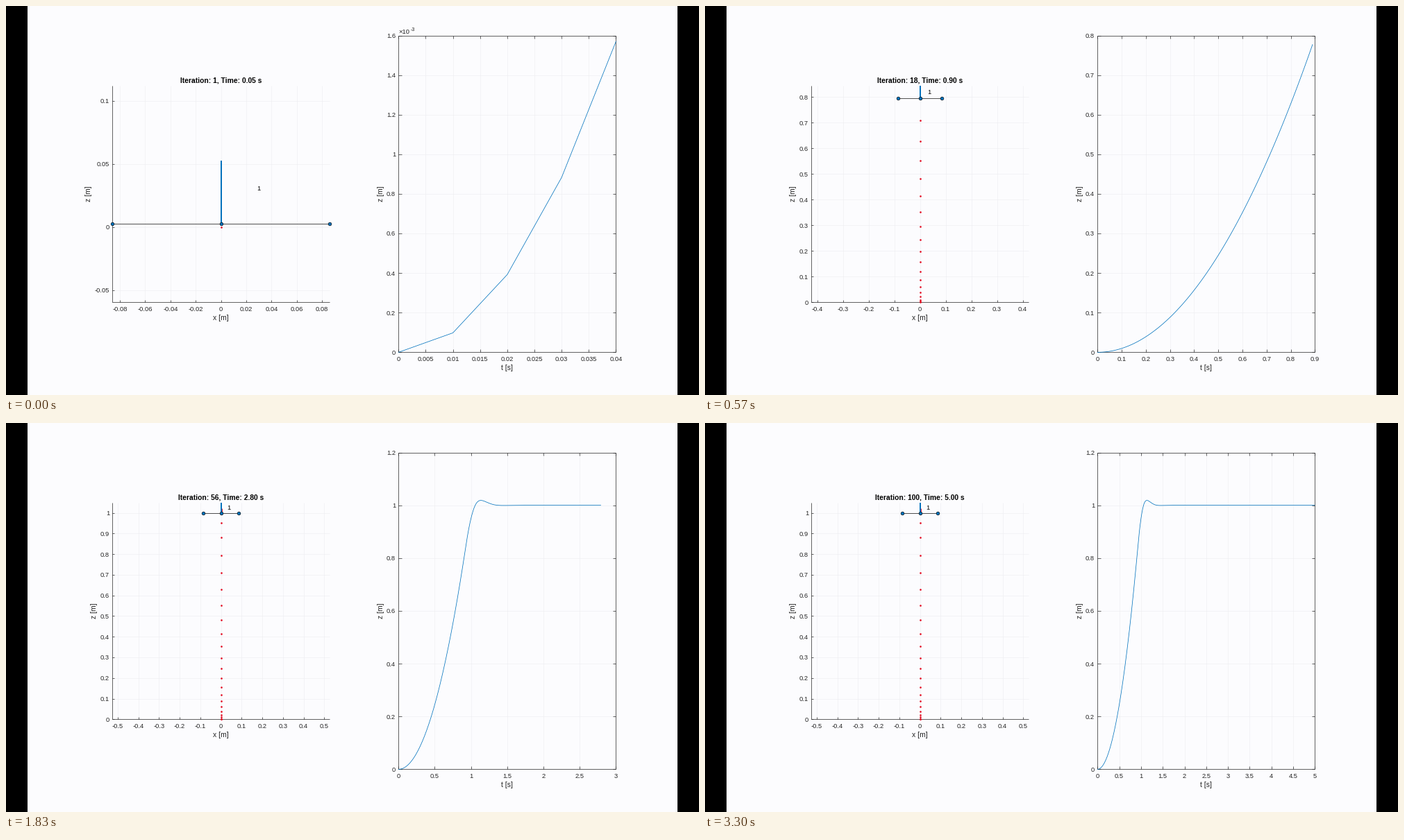
Animation of 998 by 561 pixels, one loop 3.33 s. Source, as a matplotlib script:

```python
import math

import matplotlib.pyplot as plt
import numpy as np
from matplotlib.animation import FuncAnimation
from matplotlib.collections import LineCollection
from matplotlib.patches import Rectangle

W, H, DPI = 998, 561, 64
PT = 72 / DPI                     # points per pixel
PAPER, INK, BLUE, RED = "#fcfcfe", "#262626", "#0072bd", "#e3001b"
TICK, LABEL, TITLE = 9.4, 10.35, 10.3

LEFT = (153.3, 114.8, 465.8, 427.3)    # x0, y0, x1, y1 in pixels
RIGHT = (565.3, 42.5, 878.4, 499.4)

ARM, THRUST = 0.0859, 0.05
SAMPLE, STEP = 0.01, 0.05
ITERATIONS = 100
G = 9.81

plt.rcParams["font.family"] = "Liberation Sans"


def climb():
    """Height under a PD controller with limited thrust, every 0.01 s."""
    dt, z, v, out = 0.001, 0.0, 0.0, []
    for k in range(round(ITERATIONS * STEP / dt) + 1):
        if k % 10 == 0:
            out.append(z)
        a = min(max(200 * (1 - z) - 20 * v, -G), 0.2 * G)
        z += v * dt + a * dt * dt / 2
        v += a * dt
    return np.array(out)


height = climb()
clock = np.arange(len(height)) * SAMPLE

fig = plt.figure(figsize=(W / DPI, H / DPI), dpi=DPI, facecolor=PAPER)
ax = fig.add_axes([0, 0, 1, 1])
ax.set_xlim(0, W)
ax.set_ylim(H, 0)
ax.axis("off")

for x0, x1 in ((0, 31), (967, W)):
    ax.add_patch(Rectangle((x0, 0), x1 - x0, H, color="black", lw=0))


def strokes(color, width, z):
    lines = LineCollection([], colors=color, linewidths=width * PT, zorder=z)
    ax.add_collection(lines, autolim=False)
    return lines


def plot(z, **style):
    return ax.plot([], [], zorder=z, **style)[0]


def text(x, y, s="", size=TICK, ha="center", **style):
    return ax.text(x, y, s, fontsize=size * PT, ha=ha, va="baseline",
                   zorder=8, **style)


grid = strokes("#ececef", 0.5, 1)
marks = strokes(INK, 0.7, 2)
trail = plot(3, ls="", marker="o", ms=2.6 * PT, mec="none", color=RED)
beam = plot(4, color=INK, lw=0.8 * PT)
thrust = plot(5, color=BLUE, lw=2 * PT, solid_capstyle="butt")
rotors = plot(6, ls="", marker="o", ms=4.6 * PT, mfc=BLUE, mec="#10202c",
              mew=0.8 * PT)
curve = plot(4, color=BLUE, lw=0.75 * PT)

title = text(309.5, 110.8, size=TITLE, weight="bold", color="black")
number = text(0, 0, "1", ha="left", color="black")
text(309.5, 453.2, "x [m]", LABEL, color=INK)
text(721.8, 525.2, "t [s]", LABEL, color=INK)
upright = dict(rotation=90, rotation_mode="anchor", color=INK)
left_label = text(0, 271, "z [m]", LABEL, **upright)
right_label = text(0, 271, "z [m]", LABEL, **upright)
power = [text(565.6, 39.6, "×10", ha="left", color=INK),
         text(582.2, 35.6, "-3", 7.2, ha="left", color=INK)]
pool = [text(0, 0, color=INK) for _ in range(60)]


def nice_step(span, most):
    for e in range(-5, 2):
        for m in (1, 2, 5):
            step = m * 10.0 ** e
            if span / step <= most + 1e-9:
                return step


def ticks(lo, hi, step):
    first = math.ceil(lo / step - 1e-6)
    last = math.floor(hi / step + 1e-6)
    return [k * step for k in range(first, last + 1)]


def scale(v, lo, hi, a, b):
    return a + (np.asarray(v) - lo) / (hi - lo) * (b - a)


def text_width(s):
    return TICK * sum({".": 0.278, "-": 0.333}.get(c, 0.556) for c in s)


def rule_axes(box, xlim, ylim, xstep, ystep, size, closed, unit=1):
    """Grid, frame, tick and label lists, and the widest y label."""
    x0, y0, x1, y1 = box
    lines, frame, words = [], [[(x0, y0), (x0, y1), (x1, y1)]], []
    if closed:
        frame.append([(x0, y0), (x1, y0), (x1, y1)])
    widest = 0
    for v in ticks(*xlim, xstep):
        x = scale(v, *xlim, x0, x1)
        lines.append([(x, y0), (x, y1)])
        frame.append([(x, y1), (x, y1 - size)])
        if closed:
            frame.append([(x, y0), (x, y0 + size)])
        words.append((x, y1 + 12.8, f"{v:g}", "center"))
    for v in ticks(*ylim, ystep):
        y = scale(v, *ylim, y1, y0)
        lines.append([(x0, y), (x1, y)])
        frame.append([(x0, y), (x0 + size, y)])
        if closed:
            frame.append([(x1, y), (x1 - size, y)])
        s = f"{v / unit:g}"
        widest = max(widest, text_width(s))
        words.append((x0 - 4.2, y + 3.4, s, "right"))
    return lines, frame, words, widest


def draw_vehicle(n):
    z = height[5 * n]
    top = z + THRUST
    half = max(ARM, top / 2)
    xlim = (-half, half)
    ylim = (top / 2 - half, top / 2 + half)
    xstep = nice_step(2 * half, 11)
    ystep = xstep if top > 2 * ARM else 0.05
    x0, y0, x1, y1 = LEFT

    def px(v):
        return scale(v, *xlim, x0, x1)

    def py(v):
        return scale(v, *ylim, y1, y0)

    arms = px([-ARM, 0, ARM])
    level = np.full(3, py(z))
    beam.set_data(arms, level)
    rotors.set_data(arms, level)
    thrust.set_data(px([0, 0]), py([z, top]))
    trail.set_data(px(np.zeros(n + 1)), py(height[:5 * n + 1:5]))
    number.set_position((px(ARM / 3), py(z + ARM / 3) + 4))
    title.set_text(f"Iteration: {n}, Time: {n * STEP:.2f} s")
    parts = rule_axes(LEFT, xlim, ylim, xstep, ystep, 3, False)
    left_label.set_x(x0 - 4.2 - parts[3] - 5.7)
    return parts


def draw_curve(n):
    t, z = clock[:5 * n], height[:5 * n]
    xstep, ystep = nice_step(t[-1], 10), nice_step(z.max(), 10)
    right = math.ceil(t[-1] / xstep - 1e-9) * xstep
    top = math.ceil(z.max() / ystep - 1e-9) * ystep
    x0, y0, x1, y1 = RIGHT
    curve.set_data(scale(t, 0, right, x0, x1), scale(z, 0, top, y1, y0))
    small = top < 0.0099
    for part in power:
        part.set_visible(small)
    parts = rule_axes(RIGHT, (0, right), (0, top), xstep, ystep, 4.5, True,
                      1e-3 if small else 1)
    right_label.set_x(x0 - 4.2 - parts[3] - 5.3)
    return parts


def draw(k):
    # ticks of 10 ms; each iteration holds for 30 or 40 ms
    n = (3 * k + 1) // 10 + 1
    a, b = draw_vehicle(n), draw_curve(n)
    grid.set_segments(a[0] + b[0])
    marks.set_segments(a[1] + b[1])
    words = a[2] + b[2]
    for i, item in enumerate(pool):
        item.set_visible(i < len(words))
        if i < len(words):
            x, y, s, ha = words[i]
            item.set_position((x, y))
            item.set_text(s)
            item.set_ha(ha)
    return []


anim = FuncAnimation(fig, draw, frames=333, interval=10, repeat=True,
                     repeat_delay=0, blit=False)
plt.show()
```
